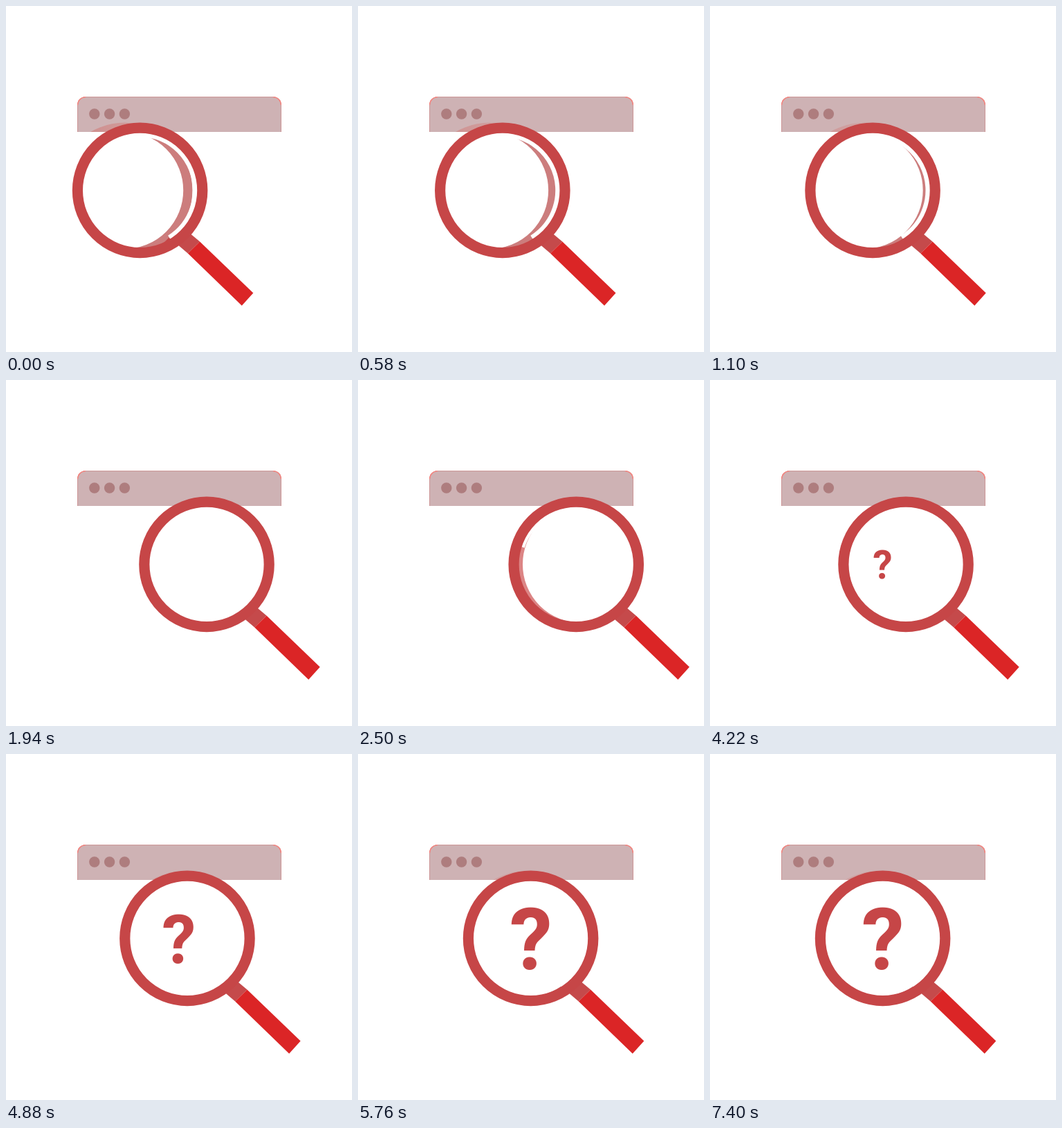
Write an HTML page with a canvas that moves like this. It is 500 px wide and 500 px high and loops after 8480 ms.

```html
<!DOCTYPE html>
<html lang="en">
<head>
<meta charset="utf-8">
<title>Search</title>
<style>
  html, body { margin: 0; width: 100%; height: 100%; overflow: hidden; background: #fff; }
  canvas { display: block; width: 100vmin; height: 100vmin; }
</style>
</head>
<body>
<canvas id="stage" width="500" height="500"></canvas>
<script>
const ctx = document.getElementById('stage').getContext('2d');
const LOOP = 8480;
const CY = 266.4, OUTER = 97.8, INNER = 82.6, SHADOW_INNER = 84.6;
const RED = '#c64647', HANDLE = '#db2526', BAR_FILL = '#ceb2b4';
const BAR = { left: 103, right: 398, top: 131, bottom: 182, r: 12 };

// The shadow on the bar fades out to the right.
const barShadow = ctx.createLinearGradient(120, 0, 290, 0);
barShadow.addColorStop(0, '#d08f8e');
barShadow.addColorStop(1, BAR_FILL);

// Steps come in threes every 140 ms: held for 20, 100 and 20 ms.
function stepAt(ms) {
  const r = ms % 140;
  return Math.floor(ms / 140) * 3 + (r < 20 ? 0 : r < 120 ? 1 : 2);
}

function ease(step, from, to) {
  const s = Math.min(1, Math.max(0, (step - from) / (to - from)));
  return s * s * (3 - 2 * s);
}

// There and back: a to b in 60 steps, then b to c in 60 more.
function travel(step, a, b, c) {
  return a + (b - a) * ease(step, 0, 60) + (c - b) * ease(step, 60, 120);
}

function disc(x, y, r, color) {
  ctx.fillStyle = color;
  ctx.beginPath();
  ctx.arc(x, y, r, 0, 7);
  ctx.fill();
}

function arc(x, y, r, from, to, width, color) {
  ctx.strokeStyle = color;
  ctx.lineWidth = width;
  ctx.beginPath();
  ctx.arc(x, y, r, from, to);
  ctx.stroke();
}

function ring(x, inner, color) {
  arc(x, CY, (OUTER + inner) / 2, 0, Math.PI * 2, OUTER - inner, color);
}

function poly(x, color, points) {
  ctx.fillStyle = color;
  ctx.beginPath();
  points.forEach(([px, py]) => ctx.lineTo(x + px, CY + py));
  ctx.fill();
}

function stub(x, color) {
  poly(x, color, [[54, 78], [71, 61], [86.5, 74], [69.2, 91]]);
}

function barPath() {
  const { left, right, top, bottom, r } = BAR;
  ctx.beginPath();
  ctx.moveTo(left, bottom);
  ctx.arcTo(left, top, right, top, r);
  ctx.arcTo(right, top, right, bottom, r);
  ctx.lineTo(right, bottom);
}

function bar(shadowX) {
  const { left, right, top, bottom, r } = BAR;
  ctx.save();
  barPath();
  ctx.clip();
  ctx.fillStyle = BAR_FILL;
  ctx.fillRect(left, top, right - left, bottom - top);
  ring(shadowX, SHADOW_INNER, barShadow);
  barPath();
  ctx.strokeStyle = '#cd9697';
  ctx.lineWidth = 2;
  ctx.stroke();
  arc(left + r, top + r, r, Math.PI, Math.PI * 1.5, 2.6, '#f9807a');
  arc(right - r, top + r, r, -Math.PI / 2, 0, 2.6, '#f9807a');
  ctx.restore();
  for (const x of [127.8, 149.6, 171.4]) disc(x, 156, 7.7, '#ae7d7e');
}

function question(scale) {
  if (scale <= 0) return;
  ctx.save();
  ctx.translate(249, 266.5);
  ctx.scale(scale, scale);
  ctx.font = '700 124px Roboto, sans-serif';
  ctx.fillStyle = RED;
  const m = ctx.measureText('?');
  ctx.fillText('?',
    (m.actualBoundingBoxLeft - m.actualBoundingBoxRight) / 2,
    (m.actualBoundingBoxAscent - m.actualBoundingBoxDescent) / 2);
  ctx.restore();
}

function lens(x, shadowX, scale) {
  disc(x, CY, INNER + 1, '#fff');
  ctx.save();
  ctx.beginPath();
  ctx.arc(x, CY, INNER + 1, 0, 7);
  ctx.clip();
  ring(shadowX, SHADOW_INNER, shadowX < x ? '#cc7d7d' : '#dc8585');
  stub(shadowX, RED);
  // White glint along the rim
  arc(x - 1, CY, 81.3, Math.PI * 1.1, Math.PI * 2.32, 7.8, '#fff');
  ctx.restore();
  question(scale);
}

function draw(ms) {
  const step = stepAt(ms % LOOP);
  const x = travel(step, 193.6, 320, 249.6);
  const shadowX = travel(step, 171.6, 328.5, 245);
  ctx.fillStyle = '#fff';
  ctx.fillRect(0, 0, 500, 500);
  bar(shadowX);
  lens(x, shadowX, ease(step, 65, 120));
  stub(x, '#c54a4b');
  poly(x, HANDLE, [[86.5, 74], [163.7, 148.3], [147.2, 166.6], [69.2, 91]]);
  ring(x, INNER, RED);
}

const start = performance.now();
function tick() {
  draw(performance.now() - start);
  requestAnimationFrame(tick);
}
tick();
</script>
</body>
</html>
```
